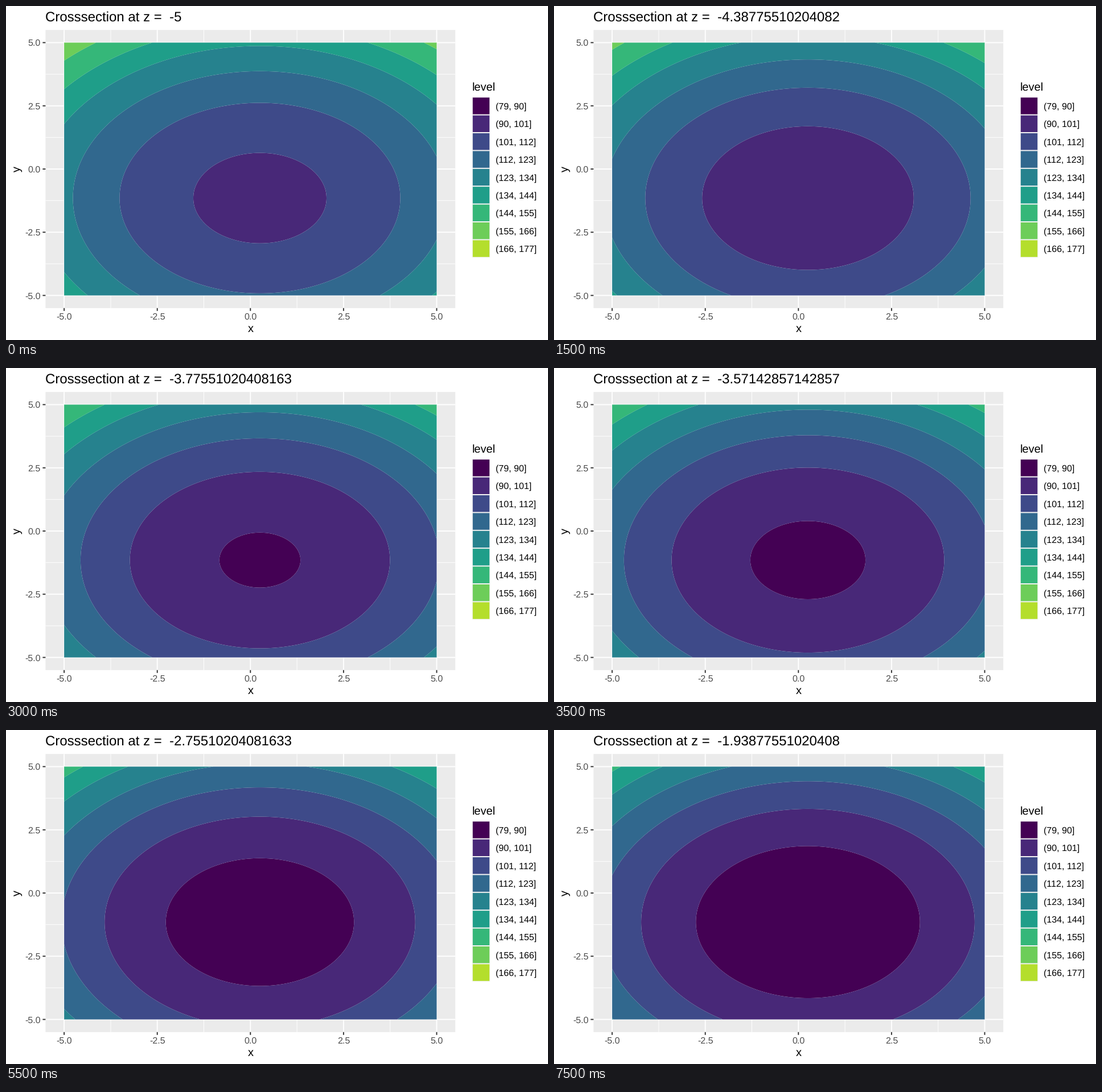
These frames come from a looping animation (952 px wide and 588 px high, 8 s). A matplotlib script:

```python
import numpy as np
import matplotlib.pyplot as plt
from matplotlib.animation import FuncAnimation
from matplotlib.patches import Rectangle

W, H, DPI = 952, 588, 100
FRAMES, INTERVAL = 16, 500
LEFT, RIGHT, TOP, BOTTOM = 69.4, 789.2, 42.2, 531.8
BREAKS = [79, 90, 101, 112, 123, 134, 144, 155, 166, 177]
COLORS = ["#440154", "#482878", "#3E4A89", "#31688E", "#26828E",
          "#1F9E89", "#35B779", "#6DCD59", "#B4DE2C"]
GREY, AXIS, LABEL = "#EBEBEB", "#333333", "#4D4D4D"

plt.rcParams["font.family"] = "Liberation Sans"
plt.rcParams["text.hinting"] = "none"

fig = plt.figure(figsize=(W / DPI, H / DPI), dpi=DPI, facecolor="white")
ax = fig.add_axes([0, 0, 1, 1])
ax.set_xlim(0, W)
ax.set_ylim(H, 0)
ax.axis("off")


def px(x):
    return (LEFT + RIGHT) / 2 + x * (RIGHT - LEFT) / 11


def py(y):
    return (TOP + BOTTOM) / 2 - y * (BOTTOM - TOP) / 11


def text(x, y, s, size, color="black", ha="left", **kw):
    return ax.text(x, y, s, fontsize=size * 72 / DPI, color=color, ha=ha,
                   va="baseline", **kw)


def line(xs, ys, color, width, z):
    ax.plot(xs, ys, color=color, lw=width * 72 / DPI, zorder=z,
            solid_capstyle="butt", snap=False)


def rect(x, y, w, h, color, z=1):
    ax.add_patch(Rectangle((x, y), w, h, fc=color, ec="none", lw=0,
                           zorder=z, snap=False))


def draw_panel():
    rect(LEFT, TOP, RIGHT - LEFT, BOTTOM - TOP, GREY, 0)
    for v in np.arange(-3.75, 5, 2.5):
        line([px(v)] * 2, [TOP, BOTTOM], "white", 0.97, 1)
        line([LEFT, RIGHT], [py(v)] * 2, "white", 0.97, 1)
    for v in np.arange(-5, 5.1, 2.5):
        x, y = px(v), py(v)
        line([x, x], [TOP, BOTTOM], "white", 1.94, 2)
        line([LEFT, RIGHT], [y, y], "white", 1.94, 2)
        line([x, x], [BOTTOM, BOTTOM + 5], AXIS, 1.94, 4)
        line([LEFT - 5, LEFT], [y, y], AXIS, 1.94, 4)
        text(x, 552.2, f"{v:.1f}", 16, LABEL, "center")
        text(60.4, y + 5.8, f"{v:.1f}", 16, LABEL, "right")
    text(px(0), 573.8, "x", 20, ha="center")
    text(24.4, py(0), "y", 20, ha="center", rotation=90,
         rotation_mode="anchor")


def draw_legend():
    x, y, key = 818.8, 160.2, 31.4
    text(x, 148.6, "level", 20)
    rect(x, y, key, key * len(COLORS), "#F2F2F2")
    for i, color in enumerate(COLORS):
        top = y + i * key
        rect(x + 1, top + 1, key - 2, key - 2, color, 2)
        text(860, top + key / 2 + 5.8,
             f"({BREAKS[i]}, {BREAKS[i + 1]}]", 16)


draw_panel()
draw_legend()
title = text(LEFT, 27.2, "", 24)

axis = np.linspace(-5, 5, 121)
gx, gy = np.meshgrid(axis, axis)
plane = (gx - 0.255) ** 2 + (gy + 1.15) ** 2
bands = None


def update(i):
    global bands
    z = -5 + 10 * i / 49
    title.set_text(f"Crosssection at z =  {z:.15g}")
    if bands is not None:
        bands.remove()
    level = plane + z * z + 1.437 * z + 79.985
    bands = ax.contourf(px(gx), py(gy), level, levels=BREAKS, colors=COLORS,
                        antialiased=True, zorder=3)
    return [title, bands]


anim = FuncAnimation(fig, update, frames=FRAMES, interval=INTERVAL,
                     init_func=lambda: update(0), repeat=True,
                     repeat_delay=0, blit=False)
plt.show()
```
